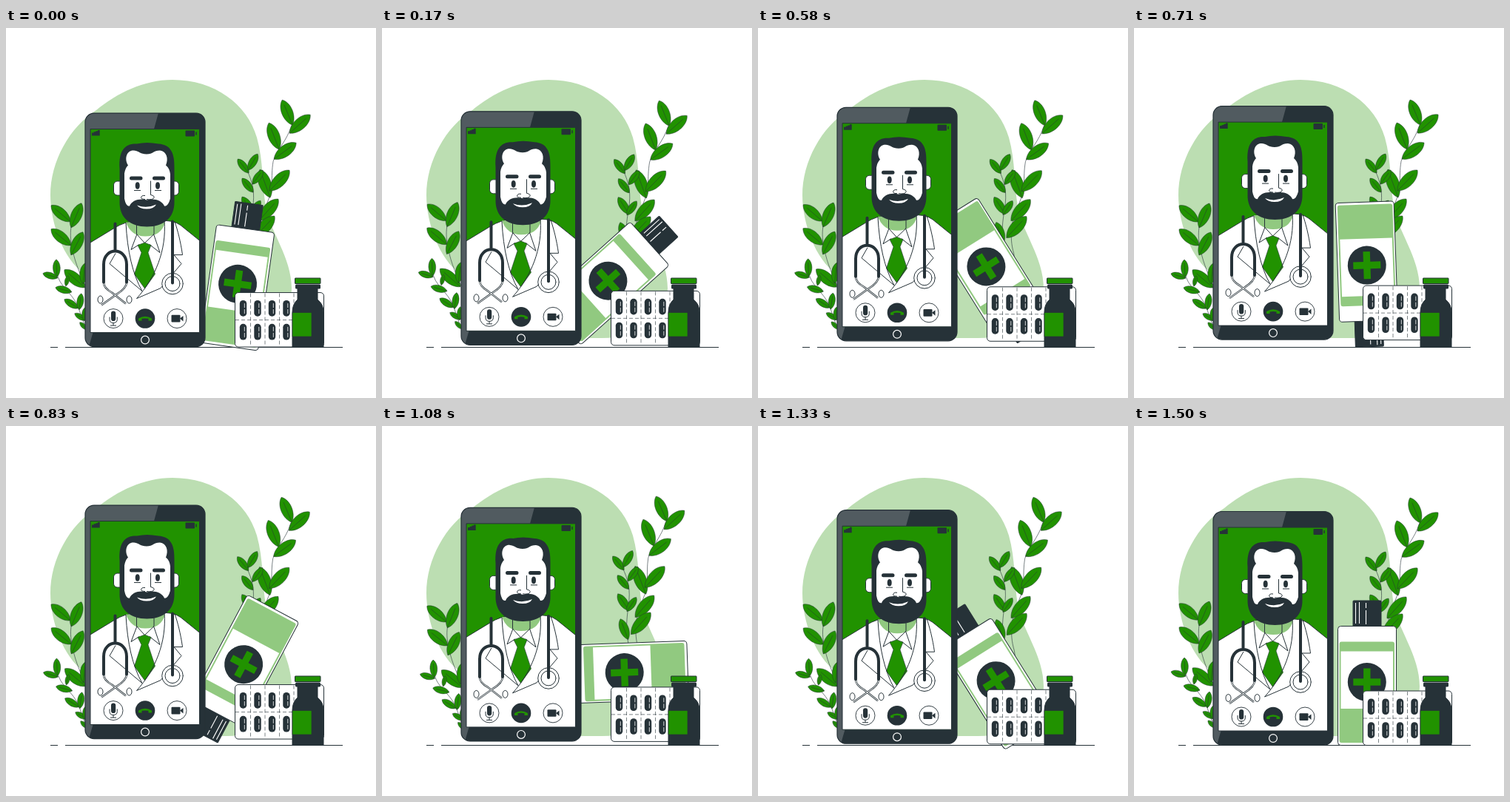
An HTML page with a canvas that plays this animation: 500x500 px, repeating every 1540 ms.

```html
<!DOCTYPE html>
<html lang="en">
<head>
<meta charset="utf-8">
<title>Online doctor</title>
<style>
html, body { margin: 0; width: 100%; height: 100%; overflow: hidden; background: #fff; }
canvas { display: block; width: 500px; height: 500px; }
</style>
</head>
<body>
<canvas id="stage" width="500" height="500"></canvas>
<script>
const ctx = document.getElementById('stage').getContext('2d');
const GREEN = '#219200', SOFT = '#91c980', PALE = '#bcdeb2';
const DARK = '#263238', GREY = '#515b60', WHITE = '#fff';
const LOOP = 1540, STEPS = 36;

function paint(path, fill, stroke, width = 1) {
  if (fill) { ctx.fillStyle = fill; ctx.fill(path); }
  if (stroke) { ctx.strokeStyle = stroke; ctx.lineWidth = width; ctx.stroke(path); }
}
const shape = (d, fill, stroke, width) => paint(new Path2D(d), fill, stroke, width);
const line = (d, width = 1, color = DARK) => shape(d, null, color, width);

function box(x, y, w, h, r, fill, stroke, width) {
  const p = new Path2D();
  p.roundRect(x, y, w, h, r);
  paint(p, fill, stroke, width);
}

function oval(x, y, rx, ry, fill, stroke, width) {
  const p = new Path2D();
  p.ellipse(x, y, rx, ry, 0, 0, Math.PI * 2);
  paint(p, fill, stroke, width);
}

function moved(draw, dx, dy) {
  ctx.save();
  ctx.translate(dx, dy);
  draw();
  ctx.restore();
}

function turned(draw, degrees, x, y) {
  ctx.save();
  ctx.translate(x, y);
  ctx.rotate(degrees * Math.PI / 180);
  ctx.translate(-x, -y);
  draw();
  ctx.restore();
}

// Pointed leaf from its tip to its base, with a midrib.
function leaf(tx, ty, bx, by) {
  const dx = bx - tx, dy = by - ty, k = 0.27;
  const side = s => [
    tx + dx * 0.2 - dy * k * s, ty + dy * 0.2 + dx * k * s,
    tx + dx * 0.75 - dy * k * s, ty + dy * 0.75 + dx * k * s
  ];
  const [a, b, c, d] = side(1), [e, f, g, h] = side(-1);
  shape(`M${tx} ${ty}C${a} ${b} ${c} ${d} ${bx} ${by}C${g} ${h} ${e} ${f} ${tx} ${ty}Z`, GREEN, DARK, 0.5);
  line(`M${tx + dx * 0.2} ${ty + dy * 0.2}L${bx} ${by}`, 0.5);
}

const leaves = list => list.forEach(l => leaf(...l));

function backdrop() {
  shape('M60 226C60 180 86 134 122 111C150 88 186 70 225 70C282 70 326 103 339 148' +
    'C348 180 346 212 351 241C356 274 386 310 386 352C386 390 352 419 297 419H190' +
    'C140 400 128 350 105 331C78 313 60 264 60 226Z', PALE);
  line('M60 431.5H70M80 431.5H455');
}

function plants() {
  line('M101 237C86 262 85 278 90 300C94 320 102 336 108 350', 0.6);
  line('M69 330C71 350 90 357 98 378C102 390 106 400 110 412', 0.6);
  leaves([
    [61, 240, 87, 262], [102, 237, 88, 270], [61, 272, 88, 294], [104, 276, 88, 307],
    [79, 327, 107, 351], [107, 318, 104, 346],
    [68, 313, 69, 337], [50, 332, 70, 338], [84, 335, 81, 349], [67, 351, 89, 357],
    [79, 367, 98, 379], [102, 359, 99, 381], [93, 386, 108, 395], [107, 378, 106, 396],
    [100, 398, 110, 408]
  ]);
  line('M386 131C379 153 366 164 361 180C357 204 363 214 352 238C343 256 339 281 346 304L351 340', 0.6);
  line('M326 193C333 208 337 222 333 245C331 260 328 275 333 300', 0.6);
  leaves([
    [373, 97, 387, 131], [411, 117, 383, 142], [355, 128, 369, 164], [392, 155, 362, 177],
    [343, 191, 357, 229], [383, 192, 356, 220], [368, 231, 342, 260], [363, 254, 336, 283],
    [313, 177, 328, 196], [340, 170, 327, 192], [319, 203, 334, 222], [347, 192, 333, 211],
    [319, 228, 334, 251], [344, 233, 331, 252], [322, 262, 332, 290]
  ]);
}

function lotion() {
  box(296, 236, 38, 35, 1, DARK, DARK);
  line('M299.5 239V267M304.5 238V267M313.5 239V246M313.5 249V268', 1.1, WHITE);
  box(275.5, 270.5, 79, 161, 4, WHITE, DARK);
  box(277.5, 291.5, 74.5, 136.5, 3, SOFT);
  ctx.fillStyle = WHITE;
  ctx.fillRect(279.5, 304.5, 70.5, 77.5);
  oval(314.8, 346, 26, 26, DARK);
  ctx.fillStyle = GREEN;
  ctx.fillRect(296.3, 341.3, 37, 9.4);
  ctx.fillRect(310.1, 327.5, 9.4, 37);
}

function doctor() {
  shape('M113 291L146 271Q160 262 177 261H202Q226 259 236 267L262 288V413H113Z', WHITE, DARK);
  shape('M162 263H215Q210 282 188 282Q169 282 162 263Z', SOFT);
  line('M176.5 264V279L187.5 291L200 279V264M177 279L169 300L180 293M199.5 279L208 304L194 293');
  shape('M178 294L187.5 290.5L196 294L192 304L201.5 333L187.5 352.5L173.5 333L183 304Z', GREEN, DARK, 0.6);
  line('M162 264C164 302 171 333 184 356L140 319L148 305M214 262C217 300 202 338 176.5 366' +
    'L209 352L237 319L227 307H238.5C236 289 232 274 228 262');

  // Stethoscope.
  line('M132 344Q132 352 143 358L162 373M163 344Q163 352 150 360L129 375', 2.4);
  line('M132 344Q132 352 143 358L162 373M163 344Q163 352 150 360L129 375', 1, WHITE);
  oval(127.5, 367.5, 3.5, 5, WHITE, DARK);
  oval(166.5, 367.5, 3.5, 5, WHITE, DARK);
  ctx.lineCap = 'round';
  line('M147.5 265V302M132 344V320C132 296 163 296 163 320V344', 4);
  oval(225, 346, 14.3, 14.3, WHITE, DARK);
  oval(225, 346, 10, 10, WHITE, DARK);
  line('M225 262V345', 4);
  ctx.lineCap = 'butt';

  // Head.
  box(145.5, 207.5, 13, 19, 5, WHITE, DARK);
  box(221, 207.5, 12.5, 19, 5, WHITE, DARK);
  shape('M153.5 190C152 166 161 156 177 157Q190 154 206 157C223 158 228 170 227.5 190V235' +
    'C228 257 213 269 190.5 269C168 269 153 257 153.5 235Z', DARK);
  shape('M160 231V197Q161 190 165 186C159 176 164 165 173 166C181 167 181 171 190 171' +
    'C199 171 199 166 208 166C217 167 220 177 216 186Q221 190 222 198V231Q219 242 214 241' +
    'C211 233 199 230 190.5 233C181 230 170 233 167 241Q162 242 160 231Z', WHITE);
  shape('M177 240Q190 245 203 239Q200 245 190 245Q181 245 177 240Z', WHITE);
  ctx.lineCap = 'round';
  line('M169.5 203.5H182M200.5 203.5H212.5', 5);
  ctx.lineCap = 'butt';
  oval(177.7, 213.5, 3, 4.8, DARK);
  oval(205, 213.5, 3, 4.8, DARK);
  line('M173 220H182M201 220H210');
  line('M195.5 207V226Q201 227 200 230Q198 233 190 232M188 227Q183 226 182.5 230Q183 232 188 232');
}

function callButtons() {
  oval(145, 393, 13, 13, WHITE, DARK, 0.9);
  box(142, 383, 6.2, 13.5, 3.1, DARK);
  line('M140 391V394Q140 399 145 399Q150.3 399 150.3 394V391M145 399V402.5M141 402.5H149');
  oval(188, 393, 13.3, 13.3, DARK);
  shape('M179 396V393Q188 387.5 197 393V396H192.5V393.3Q188 392.4 183.5 393.3V396Z', GREEN);
  oval(231, 393, 13, 13, WHITE, DARK, 0.9);
  box(223.5, 388.3, 12, 9.6, 1, DARK);
  shape('M235 393L239.5 389.5V397Z', DARK);
}

function phone() {
  const body = new Path2D();
  body.roundRect(107, 115.5, 162, 315.5, 12);
  paint(body, DARK);
  ctx.save();
  ctx.clip(body);
  shape('M107 115H206L200 137H114V412H117.5L112 431H107Z', GREY);
  ctx.restore();
  paint(body, null, DARK, 1.2);

  const screen = new Path2D('M114 137H261.5V412H114Z');
  paint(screen, GREEN);
  ctx.save();
  ctx.clip(screen);
  doctor();
  callButtons();
  ctx.restore();
  paint(screen, null, DARK);

  shape('M116 146V142H118.7V140.8H121.4V139.7H124V138.5H126.7V146Z', DARK);
  box(242.5, 139, 12.5, 8, 1, DARK);
  line('M257 141V145', 1.5);
  oval(188, 422, 5.4, 5.4, null, WHITE, 1.2);
}

function pillPack() {
  box(309.5, 358, 120, 73.5, 4.5, WHITE, DARK);
  ctx.setLineDash([5, 3]);
  line('M330.5 359V431M350 359V431M369.5 359V431M389 359V431M310 395H429', 0.6);
  ctx.setLineDash([]);
  for (let col = 0; col < 4; col++) {
    for (const y of [368.5, 400.3]) {
      const x = 315.8 + col * 19.5;
      box(x, y, 9.4, 21.6, 4.5, DARK);
      line(`M${x + 6.5} ${y + 4}V${y + 10}M${x + 6.5} ${y + 12}V${y + 18}`, 0.8, WHITE);
    }
  }
}

function syrup() {
  shape('M394 352H421V367Q429 373 429 384V431.5H387V384Q387 373 394 367Z', DARK, DARK);
  box(391, 346.5, 34, 6, 1.5, DARK);
  box(390.5, 338, 34.5, 7.5, 0.5, GREEN, DARK);
  box(387, 384.5, 26, 32.5, 0, GREEN, DARK, 0.7);
}

function draw(time) {
  const step = Math.floor((time % LOOP + 4.9) * 0.024);
  const p = Math.min(1, (step + 0.8) / STEPS);
  const lift = -10 * (1 - Math.abs(1 - 2 * p));
  const sway = p < 0.25 ? 4 * p : p < 0.75 ? 2 - 4 * p : 4 * p - 4;

  ctx.fillStyle = WHITE;
  ctx.fillRect(0, 0, 500, 500);
  backdrop();
  turned(plants, sway, 250, 250);
  turned(lotion, 360 * p, 315, 333.3);
  moved(phone, 0, lift);
  moved(pillPack, 0, lift);
  syrup();
}

function tick() {
  draw(performance.now());
  requestAnimationFrame(tick);
}
ctx.lineJoin = 'round';
tick();
</script>
</body>
</html>
```
